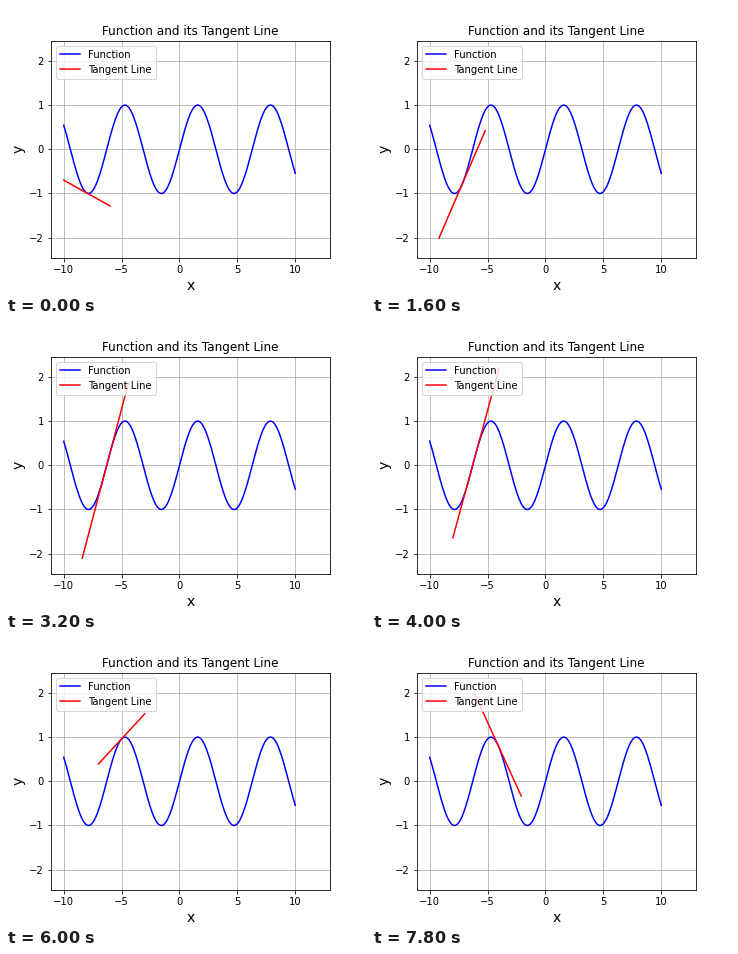
A matplotlib script for the animation above (8 s loop, 360 by 288 pixels).

```python
import numpy as np
import matplotlib.pyplot as plt
from matplotlib.animation import FuncAnimation

FRAMES = 40
INTERVAL = 200
START, STEP, REACH = -8.0, 0.1, 2.0

plt.rcParams.update({"font.family": "DejaVu Sans", "font.size": 10})


def tangent(x0):
    """End points of the tangent to sin at x0."""
    dx = np.array([-REACH, REACH])
    return x0 + dx, np.sin(x0) + np.cos(x0) * dx


def padded(values, margin=0.05):
    lo, hi = np.min(values), np.max(values)
    pad = margin * (hi - lo)
    return lo - pad, hi + pad


fig, ax = plt.subplots(figsize=(5, 4), dpi=72, facecolor="white")
fig.subplots_adjust(left=0.125, right=0.9, bottom=0.125, top=0.88)

x = np.linspace(-10, 10, 200)
ax.plot(x, np.sin(x), color="blue", lw=1.5, label="Function")
line, = ax.plot(*tangent(START), color="red", lw=1.5, label="Tangent Line")

# The view covers the tangent's whole sweep, up to x0 = 9.9
sweep = [tangent(START + STEP * i) for i in range(180)]
ax.set_xlim(padded([xs for xs, _ in sweep]))
ax.set_ylim(padded([ys for _, ys in sweep]))
ax.set_xticks([-10, -5, 0, 5, 10])
ax.set_yticks([-2, -1, 0, 1, 2])

ax.set_title("Function and its Tangent Line", fontsize=12)
ax.set_xlabel("x", fontsize=14)
ax.set_ylabel("y", fontsize=14)
ax.grid(True)
ax.legend(loc="upper left")


def update(i):
    line.set_data(*tangent(START + STEP * i))
    return line,


def reset():
    return update(0)


anim = FuncAnimation(fig, update, frames=FRAMES, init_func=reset,
                     interval=INTERVAL, repeat=True, repeat_delay=0)
plt.show()
```
